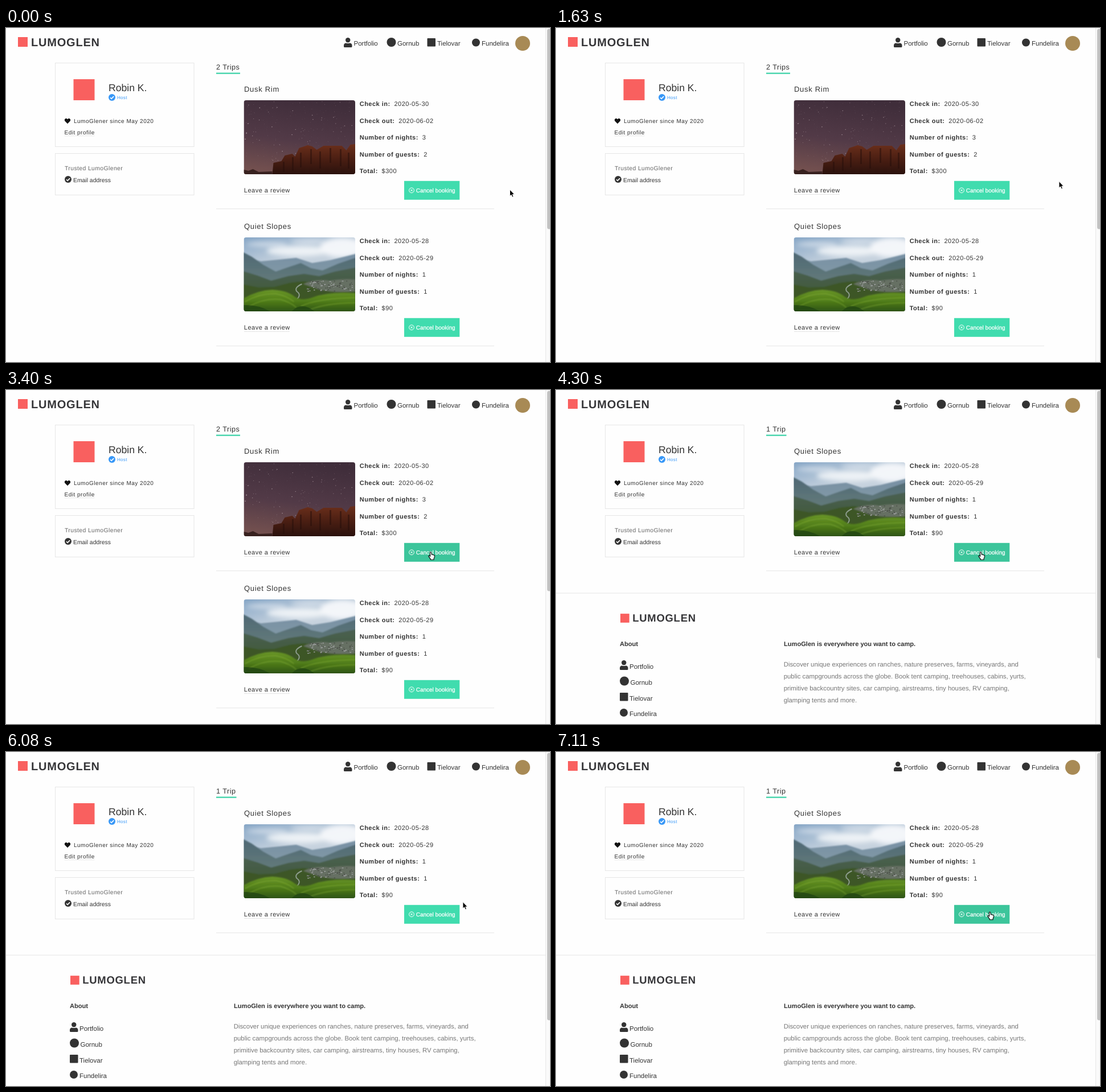
Recreate the animation shown at these times as an HTML page. Size 955 by 587 pixels, loop 8000 ms.

```html
<!DOCTYPE html>
<html lang="en">
<head>
<meta charset="utf-8">
<title>Trips</title>
<style>
html, body { margin: 0; width: 100%; height: 100%; overflow: hidden; background: #fefefe; }
svg { display: block; }
text { font-family: "Liberation Sans", Arial, sans-serif; fill: #333; white-space: pre; text-rendering: geometricPrecision; }
.b { font-weight: 700; }
.brand { font: 700 20px "Liberation Sans", sans-serif; letter-spacing: .8px; fill: #353538; }
.nav { font-size: 11.5px; }
.trips { font-size: 12.6px; letter-spacing: .5px; }
.title { font-size: 13px; letter-spacing: .7px; }
.row { font-size: 11px; letter-spacing: .5px; }
.small { font-size: 10px; letter-spacing: .5px; }
.card { font-size: 10.4px; }
.foot { font-size: 11.1px; }
.para { font-size: 11.38px; fill: #777; }
.label { font-size: 10px; fill: #fff; stroke: #fff; stroke-width: .25px; }
.line { stroke: #e6e6e6; fill: none; }
.btn { fill: #40dcae; }
.hover .btn.first { fill: #3cc59b; }
</style>
</head>
<body>
<svg id="stage" width="955" height="587" viewBox="0 0 955 587">
<defs>
  <clipPath id="frame"><rect width="195.5" height="130" rx="4"/></clipPath>
  <filter id="soft" x="-30%" y="-50%" width="160%" height="200%"><feGaussianBlur stdDeviation="4"/></filter>
  <filter id="haze"><feGaussianBlur stdDeviation="1.2"/></filter>
  <linearGradient id="dusk" x1=".6" y1="0" x2=".4" y2="1">
    <stop offset="0" stop-color="#3f2d3a"/><stop offset=".55" stop-color="#523a47"/><stop offset="1" stop-color="#73504f"/>
  </linearGradient>
  <linearGradient id="rock" x2="0" y2="1">
    <stop offset="0" stop-color="#6b2f1b"/><stop offset=".55" stop-color="#471d12"/><stop offset="1" stop-color="#2a110d"/>
  </linearGradient>
  <linearGradient id="sky" x2=".4" y2="1">
    <stop offset="0" stop-color="#86a6c6"/><stop offset=".4" stop-color="#c6d2de"/>
  </linearGradient>
  <linearGradient id="far" x2="0" y2="1">
    <stop offset="0" stop-color="#768fa3"/><stop offset="1" stop-color="#8ea3ab"/>
  </linearGradient>
  <linearGradient id="mid" x2="0" y2="1">
    <stop offset="0" stop-color="#4d6774"/><stop offset=".6" stop-color="#647b7b"/><stop offset="1" stop-color="#4c6148"/>
  </linearGradient>
  <linearGradient id="near" x2="0" y2="1">
    <stop offset="0" stop-color="#4a6052"/><stop offset="1" stop-color="#3a5429"/>
  </linearGradient>
  <linearGradient id="grass" x2="0" y2="1">
    <stop offset="0" stop-color="#699527"/><stop offset=".5" stop-color="#527f1b"/><stop offset="1" stop-color="#2e5512"/>
  </linearGradient>

  <g id="brand">
    <rect y="-8.5" width="17" height="17" fill="#f9605f"/>
    <text class="brand" x="23" y="7">LUMOGLEN</text>
  </g>
  <g id="person" fill="#333">
    <circle cx="7.2" cy="4.2" r="4.2"/>
    <path d="M0 17V13.5Q0 9.6 4 9.4Q7.2 10.8 10.4 9.4Q14.5 9.6 14.5 13.5V15.5Q14.5 17 13 17H1.5Q0 17 0 15.5Z"/>
  </g>
  <g id="check">
    <circle r="6"/><path d="M-3 .2L-.9 2.3L3.2-1.9" fill="none" stroke="#fff" stroke-width="1.6"/>
  </g>
  <g id="night" clip-path="url(#frame)">
    <rect width="196" height="130" fill="url(#dusk)"/>
    <g id="stars" fill="#e8d8dc"></g>
    <path d="M0 122L8 124L16 121L26 126L50 125V130H0Z" fill="#38211f"/>
    <path d="M50 130L52 110L66 107L72 97L85 94L90 99L97 84L112 79L120 81L128 87L140 80L172 80L180 88L187 78L196 77V130Z" fill="url(#rock)"/>
    <path d="M70 108V126M86 100V124M100 92V118M118 86V112M134 90V120M152 84V110M170 86V116M184 92V120" stroke="#260e0b" stroke-width="3" opacity=".5"/>
  </g>
  <g id="valley" clip-path="url(#frame)">
    <rect width="196" height="130" fill="url(#sky)"/>
    <g fill="#f6f8fb" filter="url(#soft)">
      <ellipse cx="172" cy="18" rx="38" ry="17" opacity=".95"/>
      <ellipse cx="95" cy="24" rx="55" ry="9" opacity=".85"/>
      <ellipse cx="40" cy="12" rx="36" ry="4" opacity=".55"/>
      <ellipse cx="112" cy="7" rx="30" ry="4" opacity=".55"/>
    </g>
    <g filter="url(#haze)">
      <path d="M-5 33L30 42L62 39L92 36L120 45L152 40L201 28V100H-5Z" fill="url(#far)"/>
      <path d="M-5 24L14 34L34 48L56 60L76 53L100 45L118 54L138 58L166 46L201 34V115H-5Z" fill="url(#mid)"/>
      <path d="M-5 58L24 67L48 76L78 68L106 64L132 68L160 60L201 52V135H-5Z" fill="url(#near)"/>
      <path d="M-5 82L26 88L54 87L80 80L104 77L150 82L201 78V135H-5Z" fill="#3d5727"/>
    </g>
    <path d="M104 82Q126 72 150 76Q174 72 196 74V95Q160 99 130 91Z" fill="#667064" filter="url(#haze)"/>
    <g id="village"></g>
    <path d="M102 82Q88 88 93 95Q102 101 92 110" fill="none" stroke="#8c9c8c" stroke-width="2"/>
    <path d="M0 107Q24 93 50 92Q76 93 89 104Q101 113 122 105Q150 95 196 98V130H0Z" fill="url(#grass)" filter="url(#haze)"/>
    <g fill="none" stroke="#8db73a" stroke-width="1.6" opacity=".5" filter="url(#haze)">
      <path d="M2 113Q28 98 56 99Q76 103 88 113"/><path d="M8 122Q36 106 64 109Q82 114 92 123"/>
      <path d="M100 121Q130 107 196 106"/><path d="M116 127Q146 115 196 115"/>
    </g>
    <path d="M0 130V119Q26 118 46 130ZM84 130Q102 112 124 130Z" fill="#204512" opacity=".75"/>
  </g>
  <path id="arrow" d="M0 0V11.6L2.6 9.2L4.4 13.3L6.4 12.4L4.7 8.5H8.2Z" fill="#000" stroke="#fff" stroke-width=".9"/>
  <path id="hand" d="M-1.2 1Q-1.2-.2 0-.2Q1.2-.2 1.3 1L1.7 4.2Q3.1 3.4 3.8 4.7Q5.1 4.1 5.6 5.3Q7 5 7 6.6Q7 9.6 5.6 11.2V13.3H-.3V11.8Q-2 9.8-3.4 7.6Q-4 6.2-2.7 6Q-1.8 6-.7 7.4Z" fill="#fff" stroke="#000" stroke-width="1.1" stroke-linejoin="round"/>
</defs>

<rect width="955" height="587" fill="#fefefe"/>
<use href="#brand" x="21" y="24.5"/>
<g id="nav"></g>
<circle cx="907" cy="27" r="13" fill="#a88a55"/>

<rect class="line" x="86.5" y="61.5" width="243.5" height="147"/>
<rect class="line" x="86.5" y="220.5" width="243.5" height="73"/>
<rect x="118.5" y="90" width="37" height="37" fill="#f9605f"/>
<text x="180" y="111" font-size="17.6">Robin K.</text>
<use href="#check" x="186" y="122" fill="#3797f7"/>
<text x="195" y="125" font-size="8" letter-spacing=".3" style="fill:#3797f7">Host</text>
<path d="M108 168.3L103.6 163.8C101.2 161 105 156.9 108 160.4C111 156.9 114.8 161 112.4 163.8Z" fill="#111"/>
<text class="small" x="119" y="167">LumoGlener since May 2020</text>
<text class="small" x="102.5" y="186.5">Edit profile</text>
<path class="line" d="M102.5 189.5H155.5"/>
<text class="card" x="103" y="249.5" letter-spacing=".4" style="fill:#666">Trusted LumoGlener</text>
<use href="#check" x="109" y="266" fill="#333"/>
<text class="card" x="118" y="270.5">Email address</text>

<g id="before"></g>
<g id="after"></g>

<rect x="947" width="8" height="587" fill="#fafafa"/>
<path d="M947.5 0V587" stroke="#e8e8e8"/>
<rect id="thumb" x="950" y="1.5" width="7" height="352" rx="3.5" fill="#c2c2c2"/>
<use id="cursor" href="#arrow"/>
</svg>
<script>
const $ = id => document.getElementById(id);
const text = (cls, x, y, s) => `<text class="${cls}" x="${x}" y="${y}">${s}</text>`;

function seeded(seed) {
  return () => (seed = (seed * 16807) % 2147483647) / 2147483647;
}

const dot = (x, y, r = 8) => `<circle cx="${x}" cy="${y}" r="${r}" fill="#333"/>`;
const box = (x, y) => `<rect x="${x}" y="${y}" width="14.5" height="14.5" rx="1" fill="#333"/>`;
const person = (x, y) => `<use href="#person" x="${x}" y="${y}"/>`;

function button(y, cls) {
  return `<g transform="translate(699 ${y})"><rect class="btn ${cls}" width="97.3" height="33"/>
    <g fill="none" stroke="#fff"><circle cx="13" cy="16.5" r="4.4"/><path d="M11.3 14.8l3.4 3.4m0-3.4l-3.4 3.4"/></g>
    ${text("label", 20.7, 20, "Cancel booking")}</g>`;
}

function trip(dy, title, photo, values) {
  const labels = ["Check in:", "Check out:", "Number of nights:", "Number of guests:", "Total:"];
  const rows = labels.map((label, i) => text("row", 620.7, 137 + dy + i * 29.5,
    `<tspan class="b">${label}</tspan> <tspan dx="3.2">${values[i]}</tspan>`));
  return text("title", 418, 112 + dy, title) +
    `<use href="#${photo}" x="417.5" y="${127 + dy}"/>` + rows.join("") +
    text("row", 417.8, 289 + dy, "Leave a review") +
    `<path class="line" d="M418 ${292.5 + dy}H498M369 ${317.8 + dy}H857"/>` +
    button(268.8 + dy, dy ? "" : "first");
}

const heading = (s, w) => text("trips", 369, 73.3, s) +
  `<rect x="369" y="78.5" width="${w}" height="2.3" fill="#40d3aa"/>`;

const slopes = dy => trip(dy, "Quiet Slopes", "valley", ["2020-05-28", "2020-05-29", 1, 1, "$90"]);

$("nav").innerHTML = person(593, 17) + dot(676.5, 25) + box(739.5, 18) + dot(825, 25.5, 7) +
  text("nav", 610.5, 31.3, "Portfolio") + text("nav", 687, 31.3, "Gornub") +
  text("nav", 757, 31.3, "Tielovar") + text("nav", 835, 31.3, "Fundelira");

$("before").innerHTML = heading("2 Trips", 42) +
  trip(0, "Dusk Rim", "night", ["2020-05-30", "2020-06-02", 3, 2, "$300"]) + slopes(241);

const about = [
  "Discover unique experiences on ranches, nature preserves, farms, vineyards, and",
  "public campgrounds across the globe. Book tent camping, treehouses, cabins, yurts,",
  "primitive backcountry sites, car camping, airstreams, tiny houses, RV camping,",
  "glamping tents and more."
];
$("after").innerHTML = heading("1 Trip", 35.5) + slopes(0) +
  `<path class="line" d="M0 357H947"/><use href="#brand" transform="translate(113 401) scale(.923)"/>` +
  text("foot b", 112, 450, "About") +
  text("foot b", 400, 450, "LumoGlen is everywhere you want to camp.") +
  about.map((s, i) => text("para", 399.7, 486.2 + i * 20.9, s)).join("") +
  person(112, 475) + dot(120, 511.5) + box(112, 532) + dot(119, 567, 7) +
  ["Portfolio", "Gornub", "Tielovar", "Fundelira"].map((s, i) =>
    text("nav", i == 1 ? 130.5 : 129, 490 + i * 27.8, s)).join("");

const rnd = seeded(41);
let stars = "", houses = "";
for (let i = 0; i < 190; i++) {
  const r = .25 + rnd() ** 3 * .55;
  stars += `<circle cx="${rnd() * 196}" cy="${rnd() * 108}" r="${r}" opacity="${.3 + rnd() * .5}"/>`;
}
for (let i = 0; i < 90; i++) {
  const x = 110 + rnd() * 84, y = 76 + rnd() * 18;
  houses += `<rect x="${x}" y="${y}" width="${1 + rnd() * 2.5}" height="1.5" fill="${i % 2 ? "#9a9d9c" : "#4b5049"}"/>`;
}
$("stars").innerHTML = stars;
$("village").innerHTML = houses;

// Pointer poses, each held until the next: time, x, y
const poses = [
  [0, 884.5, 284], [150, 881, 280], [300, 876, 275], [440, 875, 274],
  [740, 877, 281], [880, 880, 276], [1030, 881.5, 271.5], [1330, 882.5, 270.5],
  [1630, 883, 269.5], [1780, 876, 267], [1930, 858, 266.5], [2080, 833, 269], [2230, 806, 275],
  [2370, 781.5, 281.5], [2520, 772, 284], [2660, 767.5, 285], [2810, 764, 285.5],
  [2960, 759, 286], [3100, 753, 286], [3250, 748, 285.5], [3400, 745.5, 285],
  [4440, 750, 285.5], [4590, 765, 287], [4740, 790, 290], [4890, 822, 294], [5030, 847, 298], [5180, 857, 299],
  [5630, 853, 296], [5780, 840, 286], [5930, 821, 271], [6080, 802, 263.5],
  [6230, 787, 270], [6370, 778, 277], [6520, 773, 281], [6670, 771, 281.5],
  [6810, 768, 281.5], [6960, 763, 281], [7110, 761.5, 281.5]
];

function draw() {
  const t = performance.now() % 8000;
  const [, x, y] = poses.findLast(p => p[0] <= t);
  const over = x > 699 && x < 796.5 && y > 269 && y < 302;
  const cancelled = t >= 4300;
  $("before").style.display = cancelled ? "none" : "";
  $("after").style.display = cancelled ? "" : "none";
  $("thumb").setAttribute("height", cancelled ? 470 : 352);
  $("stage").classList.toggle("hover", over);
  $("cursor").setAttribute("href", over ? "#hand" : "#arrow");
  $("cursor").setAttribute("transform", `translate(${x} ${y})`);
  requestAnimationFrame(draw);
}
draw();
</script>
</body>
</html>
```
